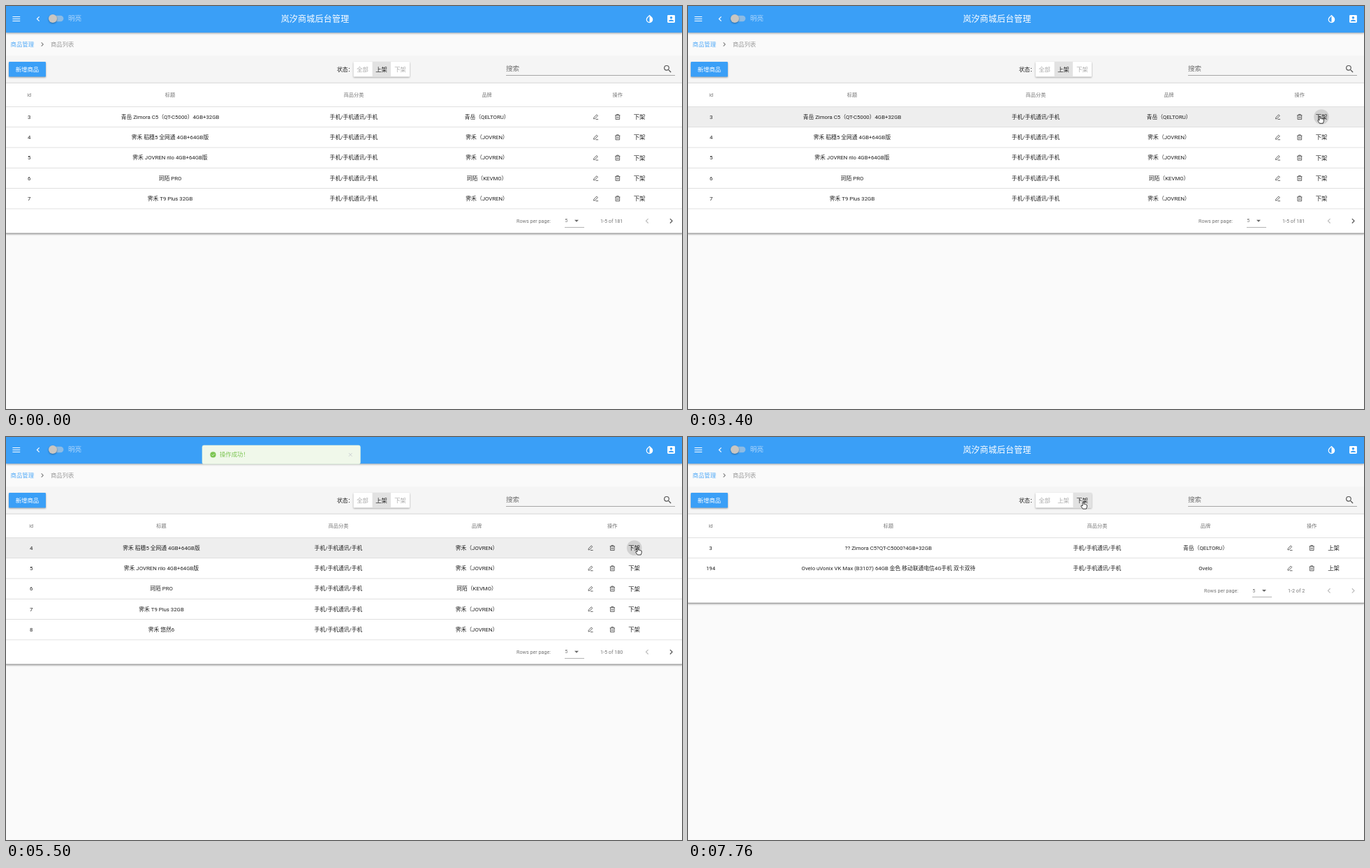
An HTML page for the animation above (8000 ms loop, 968 by 578 pixels).

```html
<!DOCTYPE html>
<html lang="zh-CN">
<head>
<meta charset="utf-8">
<title>商品列表</title>
<style>
  html, body { margin: 0; height: 100%; overflow: hidden; background: #fafafa; }
  svg { display: block; width: 968px; height: 578px; }
  text { font: 7.8px Roboto, "Noto Sans CJK SC", "Noto Sans CJK", sans-serif; fill-opacity: .87; }
  .mid { text-anchor: middle; }
  .small { font-size: 7.2px; fill-opacity: .54; }
  .btn { font-size: 8.4px; font-weight: 500; }
  .lift { filter: drop-shadow(0 1px 1px rgba(0, 0, 0, .35)); }
</style>
</head>
<body>
<svg id="stage" viewBox="0 0 968 578"></svg>
<script>
const BLUE = '#3a9ff7';
const ICON = {
  menu: 'M3 18h18v-2H3v2zm0-5h18v-2H3v2zm0-7v2h18V6H3z',
  left: 'M15.41 7.41L14 6l-6 6 6 6 1.41-1.41L10.83 12z',
  right: 'M10 6L8.59 7.41 13.17 12l-4.58 4.59L10 18l6-6z',
  drop: 'M17.66 7.93L12 2.27 6.34 7.93c-3.12 3.12-3.12 8.19 0 11.31 3.12 3.12 8.2 3.12 11.32 0 3.12-3.12 3.12-8.19 0-11.31zM12 19.59c-1.6 0-3.11-.62-4.24-1.76-2.34-2.34-2.34-6.14 0-8.48L12 5.1z',
  account: 'M3 5v14c0 1.1.9 2 2 2h14c1.1 0 2-.9 2-2V5c0-1.1-.9-2-2-2H5c-1.1 0-2 .9-2 2zm12 4a3 3 0 0 1-6 0 3 3 0 0 1 6 0zm-9 8c0-2 4-3.1 6-3.1s6 1.1 6 3.1v1H6z',
  search: 'M15.5 14h-.79l-.28-.27A6.47 6.47 0 0 0 16 9.5 6.5 6.5 0 1 0 9.5 16c1.61 0 3.09-.59 4.23-1.57l.27.28v.79l5 4.99L20.49 19zm-6 0a4.5 4.5 0 1 1 0-9 4.5 4.5 0 0 1 0 9z',
  down: 'M7 10l5 5 5-5z'
};

const icon = (name, x, y, fill, s = .6) =>
  `<path d="${ICON[name]}" fill="${fill}" transform="translate(${x - 12 * s} ${y - 12 * s}) scale(${s})"/>`;
const text = (x, y, str, cls = '', attrs = '') => `<text x="${x}" y="${y}" class="${cls}" ${attrs}>${str}</text>`;
const rect = (x, y, w, h, fill, attrs = '') =>
  `<rect x="${x}" y="${y}" width="${w}" height="${h}" fill="${fill}" ${attrs}/>`;
const stroke = (x, y, d, color = '#333') =>
  `<path d="${d}" transform="translate(${x} ${y})" fill="none" stroke="${color}" stroke-width=".75"/>`;

const pencil = (x, y) => stroke(x, y, 'M-2.9 1.1L1.1-3.2 2.7-1.7-1.3 2.5-3 2.9zM-.2 3.4H3.5');
const trash = (x, y) => stroke(x, y, 'M-3.6-2.3H3.6M-1.4-2.5V-3.6H1.4V-2.5M-2.8-2.2V3.5H2.8V-2.2M-.9-.5V2M.9-.5V2');

const TOP = 144.4, ROW = 29.3;
const CAT = '手机/手机通讯/手机';
const J = '霁禾（JOVREN）';
const first = [3, '青岳 Zimora C5（QT-C5000）4GB+32GB', '青岳（QELTORU）'];
const phones = [
  [4, '霁禾 稻穗5 全网通 4GB+64GB版', J],
  [5, '霁禾 JOVREN rilo 4GB+64GB版', J],
  [6, '珂陌 PRO', '珂陌（KEVMO）'],
  [7, '霁禾 T9 Plus 32GB', J],
  [8, '霁禾 悠然6', J]
];
const offShelf = [
  [3, '?? Zimora C5?QT-C5000?4GB+32GB', first[2]],
  [194, 'Ovelo uVonix VK Max (B3107) 64GB 金色 移动联通电信4G手机 双卡双待', 'Ovelo']
];

function table(id, rows, cols, action, range, shift = 0) {
  const bottom = TOP + ROW * rows.length, foot = bottom + 17.4, op = cols[4];
  let s = rect(0, 110, 968, bottom - 74.4, '#fff', 'class="lift"');
  s += rect(0, bottom + 34.7, 968, 1, '#8c8c8c') + rect(0, 110, 968, .8, '#d8d8d8');
  s += rect(0, TOP, 968, ROW, '#eee', 'class="hover" opacity="0"');
  ['id', '标题', '商品分类', '品牌', '操作'].forEach((h, i) =>
    s += text(cols[i], 129.6, h, 'mid small', 'font-weight="500"'));
  rows.forEach(([num, title, brand], i) => {
    const y = TOP + ROW * (i + .5);
    s += rect(0, y - ROW / 2 - .4, 968, .8, '#d9d9d9');
    [num, title, CAT, brand].forEach((v, c) => s += text(cols[c], y + 2.6, v, 'mid'));
    s += pencil(op - 31.2, y) + trash(op, y) + text(op + 31.3, y + 3, action, 'mid btn');
  });
  s += rect(0, bottom - .4, 968, .8, '#d9d9d9');
  s += text(731 + shift, foot + 2.4, 'Rows per page:', 'small') + text(800.3 + shift, foot + 2.1, '5', 'small');
  s += icon('down', 817 + shift, foot - .3, '#666') + rect(800 + shift, foot + 8.7, 28, .7, '#949494');
  s += text(851 + shift, foot + 2.4, range, 'small');
  s += icon('left', 918, foot, '#bdbdbd') + icon('right', 952.5, foot, shift ? '#bdbdbd' : '#555');
  return `<g id="${id}">${s}</g>`;
}

const header = rect(0, 0, 968, 38.2, BLUE, 'style="filter:drop-shadow(0 1.5px 1.8px rgba(0,0,0,.35))"')
  + icon('menu', 14.8, 18.5, '#fff') + icon('left', 46, 18.5, '#fff')
  + rect(62, 13.8, 20.4, 8.4, '#8dbbe4', 'rx="4.2"') + '<circle cx="67" cy="18" r="6" fill="#c9c6c2" class="lift"/>'
  + text(89, 21.2, '明亮', '', 'style="font-size:9.6px" fill="#c4e0fa"')
  + text(442.6, 23, '岚汐商城后台管理', 'mid', 'style="font-size:12px;font-weight:500;letter-spacing:.02em;fill-opacity:1" fill="#fff"')
  + icon('drop', 921.5, 18.5, '#fff') + icon('account', 952.5, 18.5, '#fff');

const tools = text(6.6, 58, '商品管理', '', `style="font-size:8.4px" fill="${BLUE}"`)
  + icon('right', 52, 55, '#757575', .5)
  + text(64, 58, '商品列表', '', 'style="font-size:8.4px;fill-opacity:.38"')
  + rect(0, 71, 968, 39, '#f5f5f5')
  + rect(4, 80, 53, 21.6, BLUE, 'rx="1.2" class="lift"')
  + text(30.4, 94, '新增商品', 'mid btn', 'fill="#fff" style="fill-opacity:1"')
  + text(474, 94, '状态：')
  + rect(497.6, 80, 80.4, 21.6, '#fff', 'rx="1.2" class="lift"')
  + rect(524.6, 80, 26.4, 21.6, '#e2e2e2', 'id="on"') + rect(551.4, 80, 26.6, 21.6, '#e2e2e2', 'id="off"')
  + text(510.5, 94, '全部', 'mid btn', 'style="fill-opacity:.34"')
  + text(537.6, 94, '上架', 'mid btn', 'id="onText"') + text(564.6, 94, '下架', 'mid btn', 'id="offText"')
  + text(716, 93.4, '搜索', '', 'style="font-size:9.6px;fill-opacity:.54"')
  + rect(716, 99.2, 242, .8, '#949494') + icon('search', 947.5, 90.3, '#555');

const toast = rect(281, 12, 226.4, 26.8, '#f0f8ea', 'rx="2.4" stroke="#e1f3d8" stroke-width=".6"')
  + '<circle cx="296.5" cy="25.4" r="4.1" fill="#7cc552"/>' + stroke(296.5, 25.4, 'M-1.9 0L-.5 1.5 2-1.3', '#f0f8ea')
  + text(306, 28.4, '操作成功！', '', 'style="font-size:8.4px;fill-opacity:1" fill="#7cc552"')
  + stroke(493.2, 25.4, 'M-2.4-2.4L2.4 2.4M2.4-2.4L-2.4 2.4', '#c0c4cc');

const stage = document.getElementById('stage');
stage.innerHTML = tools
  + table('before', [first, ...phones.slice(0, 4)], [33.2, 235, 498, 688.6, 875.8], '下架', '1-5 of 181')
  + table('after', phones, [36.2, 222.5, 476, 674, 868.3], '下架', '1-5 of 180')
  + table('result', offShelf, [32.5, 287, 586, 741, 893.2], '上架', '1-2 of 2', 8)
  + header + `<g id="toast">${toast}</g>`
  + '<circle id="halo" cy="159" r="10.8" fill-opacity=".12"/><circle id="click" r="14.2" fill="#f00"/>'
  + '<g id="cursor"><path id="arrow" d="M0 0V7.2L1.7 5.7 2.8 8.3 4 7.8 2.9 5.3H5.1z" stroke="#fff" stroke-width=".5"/>'
  + '<path id="hand" d="M-.9 6V.8Q0-.4.9.8V3.6Q1.9 2.9 2.5 3.9 3.5 3.3 4 4.3 5.3 3.9 5.3 5.2V7.4L4.3 10.3H-.6L-3.1 6.7Q-3.3 5.2-2 5.6z" fill="#fff" stroke="#111" stroke-width=".8"/></g>';

const el = id => document.getElementById(id);
const show = (id, on) => el(id).style.display = on ? '' : 'none';
const ramp = (t, a, b) => Math.min(1, Math.max(0, (t - a) / (b - a)));
const smooth = p => p * p * (3 - 2 * p);

// The CSS "ease" curve, solved by bisection.
function ease(p) {
  let lo = 0, hi = 1, u = .5;
  const bez = (a, b) => 3 * u * (1 - u) * (1 - u) * a + 3 * u * u * (1 - u) * b + u ** 3;
  for (let i = 0; i < 16; i++) {
    u = (lo + hi) / 2;
    if (bez(.25, .25) < p) lo = u; else hi = u;
  }
  return bez(.1, 1);
}

// Pointer path: time, x, y
const path = [
  [180, 500, 563], [300, 454, 480], [560, 866, 175], [900, 520, 459], [960, 520, 459],
  [1160, 882, 156], [1500, 904, 149.5], [1740, 904.5, 152.5], [1800, 904.5, 152.5], [1980, 905, 158],
  [4460, 905, 158], [4500, 905, 158.6], [5460, 905, 158.6], [5580, 904.4, 159], [5740, 904.4, 159],
  [5860, 897, 168], [6260, 639, 136.5], [6560, 639, 136.5], [7080, 566, 92.8]
];

function pointer(t) {
  const i = path.findIndex(k => k[0] > t);
  if (i < 0) return path[path.length - 1].slice(1);
  if (!i) return path[0].slice(1);
  const [a, b] = [path[i - 1], path[i]], p = smooth(ramp(t, a[0], b[0]));
  return [a[1] + (b[1] - a[1]) * p, a[2] + (b[2] - a[2]) * p];
}

const RELOAD = 3440, FILTER = 7520;

function draw(t) {
  show('before', t < RELOAD);
  show('after', t >= RELOAD && t < FILTER);
  show('result', t >= FILTER);
  const hover = ramp(t, 1040, 1200) * (1 - ramp(t, 6280, 6480));
  for (const id of ['before', 'after']) el(id).querySelector('.hover').setAttribute('opacity', hover);

  const [x, y] = pointer(t), hand = (t >= 1100 && t < 5840) || t >= 7000;
  show('cursor', t >= 180);
  show('hand', hand);
  show('arrow', !hand);
  el('cursor').setAttribute('transform', `translate(${x} ${y})`);

  show('halo', t >= 1110 && t < 5840);
  el('halo').setAttribute('cx', t < 1270 ? 876 : t < RELOAD ? 907 : 899.7);

  const second = t > 5000, press = second ? 7120 : 2680;
  show('click', t >= press && t < press + 300);
  el('click').setAttribute('cx', second ? 566 : 905.3);
  el('click').setAttribute('cy', second ? 93.2 : 159);
  el('click').setAttribute('opacity', .57 * (1 - ramp(t, press + 80, press + 300)));

  const pick = ramp(t, 7240, 7480);
  el('on').setAttribute('opacity', 1 - pick);
  el('off').setAttribute('opacity', pick);
  el('onText').style.fillOpacity = .87 - .53 * pick;
  el('offText').style.fillOpacity = .34 + .53 * pick;

  const level = dur => ease(ramp(t, 3400, 3400 + dur)) - ease(ramp(t, 6110, 6110 + dur));
  el('toast').setAttribute('transform', `translate(0 ${26.8 * (level(400) - 1)})`);
  el('toast').setAttribute('opacity', level(300));
}

let start;
function tick(now) {
  start ??= now;
  draw((now - start) % 8000);
  requestAnimationFrame(tick);
}
draw(0);
requestAnimationFrame(tick);
</script>
</body>
</html>
```
